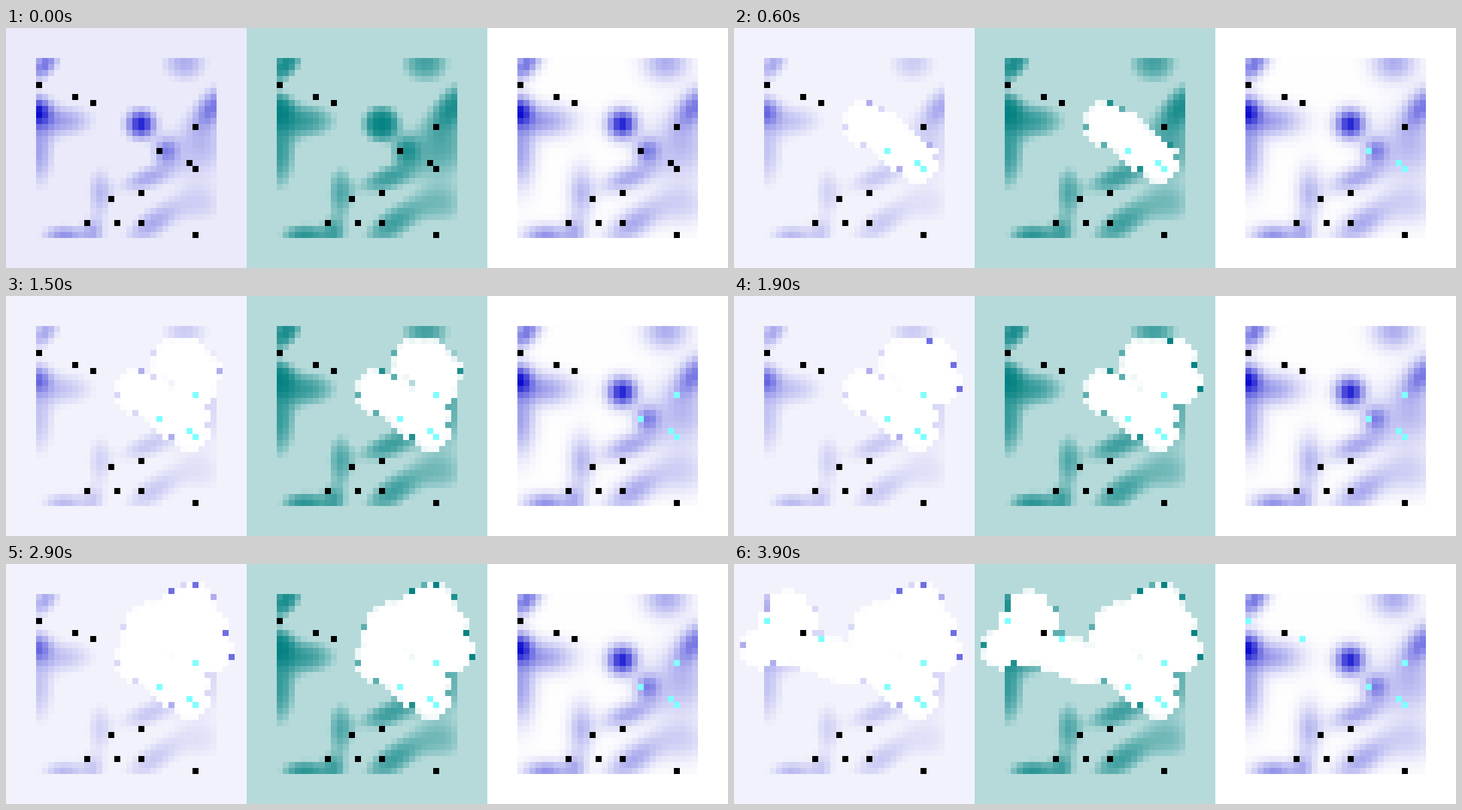
These frames come from a looping animation (1200 px wide and 400 px high, 4000 ms). A matplotlib script:

```python
import numpy as np
import matplotlib.pyplot as plt
from matplotlib.animation import FuncAnimation

N, FRAMES, CELL = 40, 40, 10
FLOOR, FADE = 0.08, 0.63
REACH, RIM = 36, 30
BLUE, TEAL = np.array([0, 0, 204]) / 255, np.array([0, 128, 128]) / 255
CYAN = np.array([128, 255, 255]) / 255

X, Y = np.meshgrid(np.arange(N) * CELL + 5, np.arange(N) * CELL + 5)


def blob(x, y, sx, sy, amp, tilt=0):
    """Gaussian bump; tilt turns its long axis up and to the right."""
    a = np.radians(tilt)
    dx, dy = X - x, Y - y
    u = dx * np.cos(a) - dy * np.sin(a)
    w = dx * np.sin(a) + dy * np.cos(a)
    return amp * np.exp(-(u / sx) ** 2 / 2 - (w / sy) ** 2 / 2)


field = sum([
    blob(52, 138, 15, 16, 0.74),
    blob(92, 155, 35, 18, 0.36),
    blob(54, 205, 17, 40, 0.36),
    blob(64, 61, 21, 12, 0.54, 50),
    blob(297, 58, 25, 21, 0.32),
    blob(224, 160, 16, 16, 0.88),
    blob(343, 131, 26, 15, 0.48, 55),
    blob(322, 195, 34, 38, 0.27),
    blob(266, 205, 14, 15, 0.44),
    blob(236, 250, 32, 13, 0.34, 20),
    blob(156, 275, 14, 30, 0.27),
    blob(97, 346, 24, 12, 0.42),
    blob(145, 340, 13, 16, 0.28),
    blob(243, 326, 36, 16, 0.33, 35),
    blob(322, 294, 32, 25, 0.17),
])
inside = (abs(X - 200) < 150) & (abs(Y - 200) < 150)
field = np.where(inside, np.clip(field, 0, 1), 0)

# Key points of the sensor's route: step, x, y
ROUTE = np.array([
    (1, 216, 157), (2, 222, 164), (3, 240, 168), (6, 306, 223),
    (8, 306, 170), (10, 322, 126), (12, 286, 106), (13, 286, 106),
    (14, 276, 107), (16, 334, 106), (17, 343, 146), (19, 290, 115),
    (22, 227, 112), (24, 245, 96), (25, 245, 96), (26, 285, 78),
    (27, 312, 66), (28, 312, 66), (31, 186, 168), (34, 107, 134),
    (36, 46, 140), (37, 72, 106), (38, 108, 98), (39, 90, 80),
]).T

# Target cell -> step at which it is found
FOUND = {(25, 20): 3, (30, 22): 5, (31, 23): 6, (31, 16): 12,
         (5, 9): 37, (14, 12): 39}
HIDDEN = [(11, 11), (22, 27), (17, 28), (13, 32), (18, 32), (22, 32), (31, 34)]
TARGETS = FOUND | dict.fromkeys(HIDDEN, FRAMES)


def survey():
    """Belief after every step: the middle of the view is cleared for good,
    the rim keeps faint traces and some misreadings."""
    rng = np.random.default_rng(7)
    v = np.maximum(field, FLOOR)
    seen = np.zeros((N, N), bool)
    states = [v.copy()]
    for k in range(1, FRAMES):
        x, y = (np.interp(k, ROUTE[0], axis) for axis in ROUTE[1:])
        dist = np.hypot(X - x, Y - y)
        fresh = (dist <= REACH) & ~seen
        trace = rng.uniform(0, 0.02, (N, N))
        wrong = rng.random((N, N)) < 0.16
        value = rng.choice([0.24, 0.24, 0.5, 0.9], (N, N))
        v[fresh] = np.where(wrong, value, trace)[fresh]
        v[dist < RIM] = 0
        seen |= fresh
        states.append(v.copy())
    return states


STATES = survey()


def shade(v, color):
    return 1 + np.clip(v, 0, 1)[..., None] * (color - 1)


def stage(k):
    v = STATES[k]
    panels = [
        shade(v * (FADE if k else 1), BLUE),
        shade(1 - np.exp(-4.2 * v), TEAL),
        shade(field, BLUE),
    ]
    for p in panels:
        for (c, r), step in TARGETS.items():
            p[r, c] = CYAN if k >= step else 0
    return np.clip(np.hstack(panels), 0, 1)


fig = plt.figure(figsize=(12, 4), dpi=100)
ax = fig.add_axes([0, 0, 1, 1])
ax.axis("off")
img = ax.imshow(stage(0), interpolation="nearest", aspect="auto")


def update(k):
    img.set_data(stage(k))
    return [img]


anim = FuncAnimation(fig, update, frames=FRAMES, interval=100,
                     repeat=True, repeat_delay=0, blit=False)
plt.show()
```
